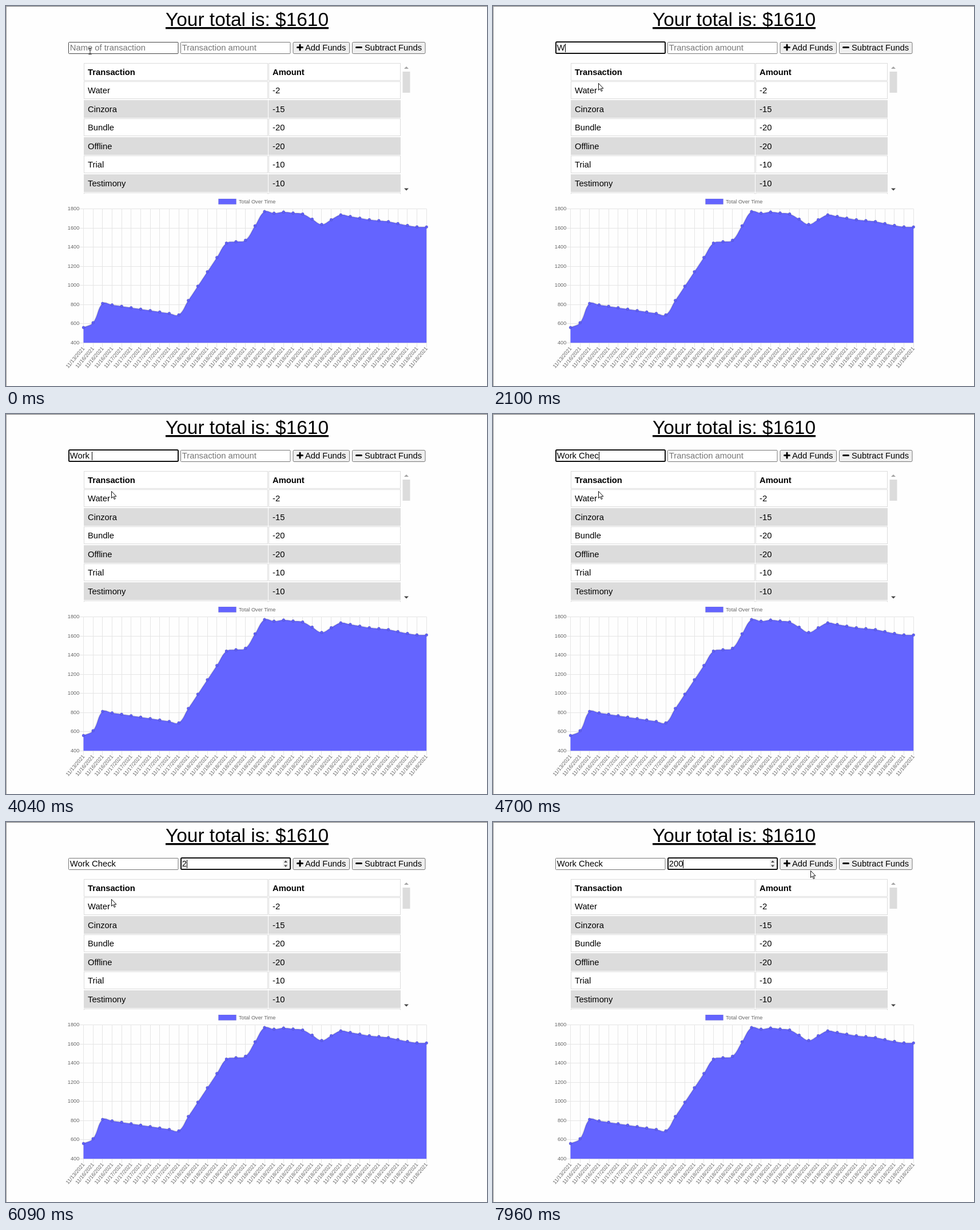
An HTML page for the animation above (8000 ms loop, 841 by 666 pixels).

```html
<!DOCTYPE html>
<html lang="en">
<head>
<meta charset="utf-8">
<title>Transaction tracker</title>
<style>
  html, body { margin: 0; width: 100%; height: 100%; overflow: hidden; background: #fefefe; }
  svg { display: block; width: 841px; height: 666px; }
  text { font: 14.77px "Liberation Sans", Arial, sans-serif; white-space: pre; }
  .title { font-size: 33.45px; text-decoration: underline; }
  .bold { font-weight: bold; }
  .small { font-size: 9.2px; fill: #666; }
</style>
</head>
<body>
<svg id="stage" viewBox="0 0 841 666" xmlns="http://www.w3.org/2000/svg"></svg>
<script>
const LOOP = 8000;
const BLINK = 530;
const BLUE = '#6464ff';
const SHADE = { stroke: '#000', 'stroke-opacity': 0.1 };
const stage = document.getElementById('stage');

function set(node, attrs) {
  for (const key in attrs) node.setAttribute(key, attrs[key]);
  return node;
}
function add(tag, attrs, parent = stage) {
  return parent.appendChild(set(document.createElementNS(stage.namespaceURI, tag), attrs));
}
function label(x, y, content, attrs = {}, parent = stage) {
  const node = add('text', { x, y, ...attrs }, parent);
  node.textContent = content;
  return node;
}
const rect = (x, y, width, height, attrs, parent) =>
  add('rect', { x, y, width, height, ...attrs }, parent);
const path = (d, attrs, parent) => add('path', { d, ...attrs }, parent);
const show = (node, on) => set(node, { visibility: on ? 'visible' : 'hidden' });
const mix = (a, b, s) => a + (b - a) * s;

// Page edge and heading
rect(0, 0, 841, 1, { fill: '#777' });
rect(0, 0, 1, 666, { fill: '#999' });
label(279, 35, 'Your total is: $1610', { class: 'title' });

// Form: each burst types its text at an even pace
function makeField(left, placeholder, focusAt, blurAt, bursts) {
  const start = left + 2.8;
  const keys = bursts.flatMap(({ text, at, step }) =>
    [...text].map((char, i) => ({ char, at: at + i * step })));
  return {
    left, start, placeholder, focusAt, blurAt, keys,
    box: add('rect', { fill: '#fff' }),
    text: label(start, 78, '')
  };
}
const nameField = makeField(109, 'Name of transaction', 340, 5480, [
  { text: 'Work', at: 2100, step: 150 },
  { text: ' Check', at: 4040, step: 165 }
]);
const amountField = makeField(305, 'Transaction amount', 5480, LOOP, [
  { text: '200', at: 6090, step: 230 }
]);

const spinner = add('g', {});
rect(484, 66, 10, 14, { fill: '#efefef' }, spinner);
path('M486 71l3-3.5 3 3.5zM486 75.5l3 3.5 3-3.5z', { fill: '#444' }, spinner);
const caret = rect(0, 66, 1, 15, { fill: '#000' });

function button(x, width, textX, caption, icon) {
  rect(x, 63.5, width, 20, { rx: 2, fill: '#efefef', stroke: '#767676' });
  path(icon, { stroke: '#000', 'stroke-width': 3, 'stroke-linecap': 'round' });
  label(textX, 78, caption);
}
button(502, 98.5, 523, 'Add Funds', 'M509.5 72.5h9M514 68v9');
button(605.5, 127.5, 627, 'Subtract Funds', 'M612.5 72.5h9');

// Table, newest transaction first
const transactions = [
  ['Water', -2], ['Cinzora', -15], ['Bundle', -20],
  ['Offline', -20], ['Trial', -10], ['Testimony', -10]
];
const clip = add('clipPath', { id: 'tableClip' });
rect(130, 98, 570, 231.5, {}, clip);
const table = add('g', { 'clip-path': 'url(#tableClip)' });
[['Transaction', 'Amount'], ...transactions, ['', '']].forEach((cells, i) => {
  const top = Math.floor(100 + i * 32.5) + 0.5;
  const shaded = i > 0 && i % 2 === 0;
  const style = { fill: shaded ? '#dcdcdc' : '#fff', stroke: '#dcdcdc' };
  rect(136.5, top, 321, 30, style, table);
  rect(459.5, top, 230, 30, style, table);
  cells.forEach((cell, c) =>
    label(c ? 466 : 143, top + 20, cell, { class: i ? '' : 'bold' }, table));
});
rect(693.5, 115, 13, 37, { fill: '#dcdcdc' });
path('M696 110l4-4 4 4z', { fill: '#a3a3a3' });
path('M696 319.5l4 4 4-4z', { fill: '#444' });

// Chart: straight runs between turning points, then the listed transactions
const turns = [
  [0, 560], [1, 610], [2, 812], [10, 692], [15, 1442], [17, 1472], [19, 1772],
  [20, 1755], [21, 1767], [23, 1747], [25, 1637], [27, 1737], [30, 1687]
];
const totals = [turns[0][1]];
turns.slice(1).forEach(([end, value], k) => {
  const [begin, from] = turns[k];
  for (let i = begin + 1; i <= end; i++) totals.push(mix(from, value, (i - begin) / (end - begin)));
});
[...transactions].reverse().forEach(([, amount]) => totals.push(totals.at(-1) + amount));

const chart = { left: 135.5, right: 735.2, top: 355.5, bottom: 590.2 };
const xAt = i => mix(chart.left, chart.right, i / (totals.length - 1));
const yAt = v => mix(chart.bottom, chart.top, (v - 400) / 1400);
const points = totals.map((v, i) => [xAt(i), yAt(v)]);

rect(371.5, 338, 31, 9.5, { fill: BLUE, ...SHADE });
label(407, 345.5, 'Total Over Time', { class: 'small' });

for (let v = 400; v <= 1800; v += 200) {
  const y = Math.floor(yAt(v)) + 0.5;
  path(`M128 ${y}H${chart.right}`, { stroke: '#e5e5e5' });
  label(128.3, yAt(v) + 2.8, v, { class: 'small', 'text-anchor': 'end' });
}
points.forEach(([x], i) => {
  path(`M${Math.floor(x) + 0.5} ${chart.top}V598`, { stroke: '#e5e5e5' });
  const day = i === 0 ? 13 : i < 4 ? 16 : i < 11 ? 17 : 18;
  label(0, 3.2, `11/${day}/2021`, {
    class: 'small', 'text-anchor': 'end',
    transform: `translate(${x} 598.5) rotate(-50)`
  });
});

// Cardinal spline whose handles follow the neighbouring distances
function spline(pts, tension = 0.4) {
  const gap = (a, b) => Math.hypot(a[0] - b[0], a[1] - b[1]);
  const handles = pts.map((p, i) => {
    const before = pts[i - 1] || p, after = pts[i + 1] || p;
    const d0 = gap(before, p), d1 = gap(p, after);
    const move = k => [p[0] + k * (after[0] - before[0]), p[1] + k * (after[1] - before[1])];
    return [move(-tension * d0 / (d0 + d1)), move(tension * d1 / (d0 + d1))];
  });
  return `M${pts[0]}` +
    pts.slice(1).map((p, i) => `C${handles[i][1]} ${handles[i + 1][0]} ${p}`).join('');
}
const curve = spline(points);
path(`${curve}V${chart.bottom}H${chart.left}Z`, { fill: BLUE });
path(curve, { fill: 'none', 'stroke-width': 2.3, ...SHADE });
points.forEach(([cx, cy]) => add('circle', { cx, cy, r: 2.5, fill: '#5f5ff4', ...SHADE }));

// Pointers
const beam = path('M144.5 74.5h2l.5.5.5-.5h2M147 75v9M144.5 84.5h2l.5-.5.5.5h2',
  { fill: 'none', stroke: '#222' });
const arrow = path('M0 0V12L2.8 9.4 4.8 14 6.7 13.2 4.7 8.8H8.4Z', { fill: '#fff', stroke: '#111' });

// Each move follows a quadratic curve in even time steps
const moves = [
  { at: 810, end: 1050, steps: 4, curve: [[147, 79], [166, 107.5], [185, 136]],
    ease: p => 1 - (1 - p) ** 1.6 },
  { at: 7450, end: 7960, steps: 9, curve: [[185, 136], [327, 228], [556, 86]],
    ease: p => mix(p, p * p * (3 - 2 * p), 0.7) }
];
function pointerAt(t) {
  const { at, end, steps, curve: [a, b, c], ease } = moves.findLast(m => m.at <= t) || moves[0];
  const p = Math.min(1, Math.max(0, Math.floor((t - at) / (end - at) * steps) / steps));
  const s = ease(p);
  return [0, 1].map(k => mix(mix(a[k], b[k], s), mix(b[k], c[k], s), s));
}

function drawField(field, t) {
  const focused = t >= field.focusAt && t < field.blurAt;
  const hovered = field === nameField && t < field.focusAt;
  const value = field.keys.filter(key => key.at <= t).map(key => key.char).join('');
  set(field.box, focused
    ? { x: field.left + 1, y: 63, width: 191, height: 20, rx: 1.5, stroke: '#101010', 'stroke-width': 2 }
    : { x: field.left + 0.5, y: 63.5, width: 191.5, height: 20, rx: 1,
        stroke: hovered ? '#444' : '#767676', 'stroke-width': 1 });
  field.text.textContent = value || field.placeholder;
  set(field.text, { fill: value ? '#000' : '#757575' });
  if (!focused) return;

  // The caret restarts its blink at focus and at every key
  const length = value ? field.text.getComputedTextLength() : 0;
  const lastInput = Math.max(field.focusAt, ...field.keys.map(key => key.at).filter(at => at <= t));
  set(caret, { x: Math.round(field.start + length) });
  show(caret, (t - lastInput) % (2 * BLINK) < BLINK);
}

function render(t) {
  show(caret, false);
  drawField(nameField, t);
  drawField(amountField, t);
  show(spinner, t >= amountField.focusAt);

  const overField = t < 870;
  show(beam, overField);
  show(arrow, !overField);
  const [x, y] = pointerAt(t);
  set(arrow, { transform: `translate(${x - 0.5} ${y - 0.5})` });
}

let begin;
function tick(now) {
  begin ??= now;
  render((now - begin) % LOOP);
  requestAnimationFrame(tick);
}
render(0);
requestAnimationFrame(tick);
</script>
</body>
</html>
```
